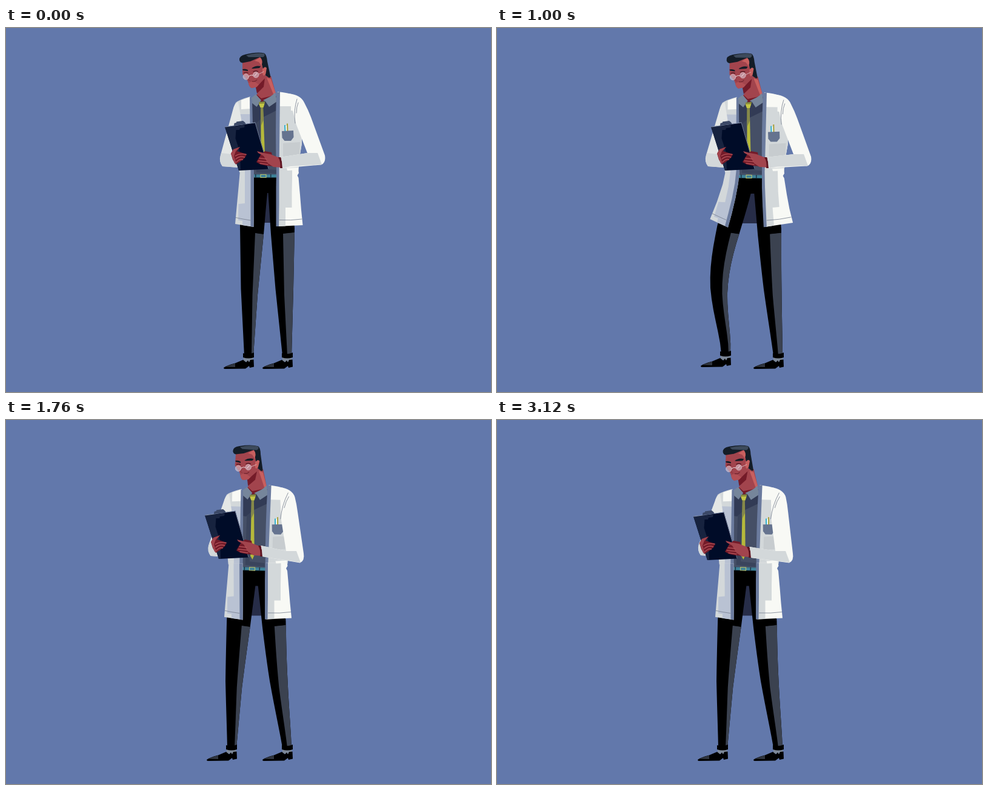
An HTML page that plays this animation: 800x600 px, repeating every 5.04 s.

```html
<!DOCTYPE html>
<html lang="en">
<head>
<meta charset="utf-8">
<title>Doctor with clipboard</title>
<style>
  html, body { margin: 0; width: 100%; height: 100%; overflow: hidden; background: #6278ab; }
  svg { display: block; width: 100%; height: 100%; }
</style>
</head>
<body>
<svg id="stage" viewBox="0 0 800 600"></svg>
<script>
const LOOP = 5040;
const stage = document.getElementById('stage');
const parts = [];

// Each track is a list of step, value pairs; steps run at twelve per second.
const tracks = {
  hipX: [7, 0, 8, -1, 12, -9, 15, -16.5, 21, -18.5],
  hipY: [7, 0, 12, 1, 15, 1.5],
  lean: [7, 0, 8, .2, 12, .8, 15, 1.7],
  nod: [15, 0, 21, 2.5, 25, 2.5, 37, .5],
  boardX: [7, 0, 8, -1, 12, -8, 15, -14, 21, -33, 25, -40, 28, -40.4, 37, -37],
  boardY: [12, 0, 15, .5, 21, -6, 25, -8, 28, -8, 37, -4],
  elbowX: [7, 0, 8, -1, 12, -8, 15, -14, 21, -35, 25, -42, 28, -42.3, 37, -38],
  elbowY: [7, 0, 12, 2, 15, 4, 21, 10, 25, 11, 37, 10],
  cuffX: [7, 0, 8, -1, 12, -9, 15, -16, 21, -19.5, 25, -21],
  cuffY: [12, 0, 15, 1, 21, -4, 25, -5],
  footX: [7, 0, 8, -1.5, 12, -23, 14, -28],
  footY: [7, 0, 8, -2, 10, -5, 12, -3, 14, 0],
  knee: [7, 0, 8, -13, 10, -20, 12, -18.5, 15, -3, 21, -1],
  flapL: [7, 0, 8, -3, 12, -18.5, 15, -11, 21, .5],
  flapR: [7, 0, 8, .5, 12, 7, 15, 4.5, 21, 0],
  blink: [0, 0, 1, .5, 2, 1, 3, .8, 4, .3, 5, 0]
};
const pose = {};

const clamp = v => Math.max(0, Math.min(1, v));
const mix = (a, b, k) => [a[0] + (b[0] - a[0]) * k, a[1] + (b[1] - a[1]) * k];

// Monotone cubic interpolation
function valueAt(track, step) {
  const last = track.length / 2 - 1;
  const at = i => track[2 * i], val = i => track[2 * i + 1];
  if (step <= at(0)) return val(0);
  if (step >= at(last)) return val(last);
  let i = 0;
  while (at(i + 1) <= step) i++;
  const slope = k => (val(k + 1) - val(k)) / (at(k + 1) - at(k));
  const tangent = k => {
    if (k === 0 || k === last) return 0;
    const a = slope(k - 1), b = slope(k);
    return a * b > 0 ? 2 * a * b / (a + b) : 0;
  };
  const span = at(i + 1) - at(i), u = (step - at(i)) / span, w = 1 - u;
  return val(i) * w * w * (1 + 2 * u) + val(i + 1) * u * u * (3 - 2 * u)
    + span * u * w * (tangent(i) * w - tangent(i + 1) * u);
}

function turn(x, y, cx, cy, degrees) {
  const a = degrees * Math.PI / 180, c = Math.cos(a), s = Math.sin(a);
  return [cx + (x - cx) * c - (y - cy) * s, cy + (x - cx) * s + (y - cy) * c];
}

// Maps from the resting position to the current pose
function body(x, y) {
  const [px, py] = turn(x, y, 428, 245, pose.lean);
  return [px + pose.hipX, py + pose.hipY];
}
const head = (x, y) => body(...turn(x, y, 425, 100, pose.nod));
const brow = (x, y) => head(x, y + 1.6 * pose.blink);
const board = (x, y) => [x + pose.boardX, y + pose.boardY];
const hips = (x, y) => [x + pose.hipX, y + pose.hipY];
const footL = (x, y) => [x + pose.footX, y + pose.footY];
const footR = (x, y) => [x + 64, y];

function leg(x, y, footX, footY, bend) {
  const s = clamp((y - 240) / 300);
  const bulge = clamp(Math.sin(Math.PI * s ** 1.2)) ** 1.5;
  return [x + pose.hipX * (1 - s) + footX * s + bend * bulge,
          y + pose.hipY * (1 - s) + footY * s];
}
const legL = (x, y) => leg(x, y, pose.footX, pose.footY, pose.knee);
const legR = (x, y) => leg(x, y, 0, 0, pose.hipX * .15);

function skirtL(x, y) {
  const t = clamp((y - 236) / 90);
  return hips(x + pose.flapL * t ** 1.4, y + pose.flapL * .5 * t * (409 - x) / 31);
}
function skirtR(x, y) {
  const t = clamp((y - 236) / 90), k = (x - 447) / 42;
  return hips(x + pose.flapR * t ** 1.6 * (.5 + .6 * k), y - pose.flapR * .7 * t * k);
}
function armL(x, y) {
  return mix(body(x, y), [x + pose.cuffX, y + pose.cuffY], clamp((y - 150) / 50));
}
function armR(x, y) {
  const p = mix(body(x, y), [x + pose.elbowX, y + pose.elbowY], clamp((y - 120) / 85));
  return y > 200 ? mix(p, board(x, y), clamp((490 - x) / 30)) : p;
}

function add(map, d, attrs) {
  const el = document.createElementNS('http://www.w3.org/2000/svg', 'path');
  for (const name in attrs) el.setAttribute(name, attrs[name]);
  stage.append(el);
  parts.push({ el, map, d });
}
const fill = (map, color, d) => add(map, d + 'Z', { fill: color });
const line = (map, color, width, d) =>
  add(map, d, { fill: 'none', stroke: color, 'stroke-width': width, 'stroke-linecap': 'round' });

// Straight outline cut into short pieces so that it can bend
function limb(map, color, outline) {
  const pts = outline.split(', ').map(p => p.split(' ').map(Number)), cuts = 6, out = [];
  pts.forEach((p, i) => {
    const next = pts[(i + 1) % pts.length];
    for (let k = 0; k < cuts; k++) out.push(mix(p, next, k / cuts).map(v => v.toFixed(2)).join(' '));
  });
  fill(map, color, 'M' + out.join(' L'));
}
function lens(x, y) {
  const pts = Array.from({ length: 20 }, (_, i) => {
    const a = i * Math.PI / 10;
    return (x + 4.7 * Math.cos(a)).toFixed(2) + ' ' + (y + 4.7 * Math.sin(a)).toFixed(2);
  });
  add(head, 'M' + pts.join(' L') + 'Z',
    { fill: '#e0d0dc', 'fill-opacity': .55, stroke: '#d9bcc6', 'stroke-width': .8 });
}

const WHITE = '#f8f9f5', GREY = '#d3d8da', LILAC = '#b9c2d3', LAPEL = '#6b7b9e';
const SKIN = '#a2444d', GLOW = '#c8605f', BLOOD = '#741b29', HAIR = '#141d27';
const SLATE = '#3b4250', SEAM = '#747d8d', FINGER = '#b04f56';

// Coat lining, legs and shoes
fill(hips, '#272d48', 'M412 262 L450 262 L448 321 L414 321');
fill(hips, '#000', 'M400 243 L452 243 L452 274 L433.5 272 L429.5 272 L400 274');
limb(legL, '#000', '390 250, 430 250, 431 272, 428 305, 425 340, 415 440, 408 540, 393 540, 387.5 430, 386 326');
limb(legL, SLATE, '411 338, 425 340, 415 440, 408 540, 405 540, 406.5 440');
limb(legR, '#000', '434 250, 470 250, 476 330, 474 430, 471 540, 456 540, 444.5 430, 437 340, 432.5 272');
limb(legR, SLATE, '457 339, 476 337, 474 430, 471 540, 464 540, 459 440');
for (const foot of [footL, footR]) {
  fill(foot, '#7d8898', 'M392 543 L407 543 L408 550 L392 550');
  fill(foot, '#000', 'M359 560 Q364 556 378 552.5 L391 547 L396 551 L399 548 L401 551 L403 547 L408.5 546.5 L409 558.5 L402 560 L401 557 L395 561.5 L361 562 Q359 562 359 560');
  fill(foot, '#2f343e', 'M362 558.5 Q367 555.5 378 553 L378 559');
  fill(foot, '#000', 'M391 536 Q400 539 409 535 L409 543 Q400 546 391 543');
}

// Shirt, tie and belt
fill(body, '#454f66', 'M404 118 L446 112 L448 245 L406 245');
fill(body, '#323b55', 'M406 122 L446 118 L446 136 L424 147 L412 158 L406 157');
fill(body, '#3a445c', 'M413 157 L420 150 L420 232 L446 234 L446 240 L413 238');
fill(body, '#b5b93b', 'M420 129 L424 129 L427.5 221 L424.5 228.5 L421 223');
fill(body, '#85884a', 'M420 129 L424 129 L424.6 152 L420.4 162');
fill(body, '#3d8299', 'M408 241.5 L447 241.5 L447 246.5 L408 246.5');
fill(body, '#1f3546', 'M411 241 L412.5 241 L412.5 247 L411 247');
fill(body, '#1f3546', 'M436 241 L437.5 241 L437.5 247 L436 247');
line(body, '#b3bd6b', 1.2, 'M420 241.5 L429 241.5 L429 246.5 L420 246.5 Z');

// Neck and collar
fill(head, SKIN, 'M411 96 L427 79 L437 79 L445 108 L424 119 L413 111 L417 104');
fill(head, BLOOD, 'M412 98 L427 83 L425 97 L414 108');
fill(head, GLOW, 'M430 82 L437 84 L445 108 L441 109');
fill(body, BLOOD, 'M413 109 L421 116 L438 112 L424 121 L420 121');
fill(body, '#76869b', 'M405 115 L412 109.5 L421 119 L413.5 130 L405 123');
fill(body, '#76869b', 'M424 119 L438 112 L444 106 L447 121 L434 130 L428 121');
fill(body, '#8b8d3c', 'M417 122 L427.5 121 L424.5 131 L419.5 131');
fill(body, '#c3c646', 'M417 125 L426.5 124.5 L424.5 131 L419.5 131');

// Face
fill(head, SKIN, 'M390 56 L422 47 L426 64 L431 67 L428 80 Q421 89 414 97 L405 99 Q401 97 400 91 L398 86 L390 76');
fill(head, GLOW, 'M410 54 L422 47 L425 60 L423 64 L417 56');
fill(head, GLOW, 'M423 67 Q428 62 431 66 L430 74 L425 79 L423 75');
fill(head, '#b34f55', 'M400 91 L407 87 L417 93 L413 97.5 L405 99 Q401 97 400 91');
fill(head, HAIR, 'M385 53 Q384 46 395 43.5 Q414 39 426 41.5 Q430 44 431 55 L436.5 81 L434 82 L428 78 L430 66 Q427 62 424 67 L422 60 Q424 53 419 48 L403 55 L390 57.5 Q386 57 385 53');
fill(head, '#3d4a5b', 'M396 45 Q412 40 426 42 Q428 46 424 48 L400 48');
fill(brow, HAIR, 'M390 68 Q395 66.5 399 69 L399 71 L391 70');
fill(brow, HAIR, 'M405 66.5 Q412 61 420 63 L418 66 L407 67');
line(brow, '#4d1520', 1.2, 'M392.5 74 Q396 72.5 399 74');
line(brow, '#4d1520', 1.2, 'M408 72 Q412 70 415.5 71.5');
line(head, '#5e1723', 1, 'M406 88 Q411 89 414 85.5');
line(head, '#8c333e', 1, 'M402 80 L400 86 L403 87');
lens(395.8, 80.4);
lens(412.2, 77.2);
line(head, '#eadade', 1, 'M400.5 79.5 Q404 76.5 407.5 78');
line(head, '#dfc3ca', .8, 'M417 76 L425 72');
line(head, '#f0e4e8', 1, 'M410 79 L414 74.5');

// Coat, left side
fill(body, GREY, 'M403 113 Q385 118 379 123 Q374 130 374 150 L385 238 L407 238');
fill(body, WHITE, 'M388 119 L403 113.5 L403 133 L388 134');
fill(body, LILAC, 'M386 142 L404 142 L404 238 L394 238 L394 160 L386 158');
fill(body, LAPEL, 'M402 113 L406 118 L409 238 L403.5 238');
fill(skirtL, GREY, 'M386 235 L409 235 L409 255 L409 280 L409 305 L408.5 328 L378 323 L381 290 L384 258');
fill(skirtL, LILAC, 'M394 235 L404 235 L404 262 L404 290 L404 327 L390 325 L390 318 L383 317 L383.5 290 L394 289 L394 262');
fill(skirtL, LAPEL, 'M403.5 235 L409 235 L409 255 L409 280 L409 305 L408.5 328 L403.5 327 L403.5 305 L403.5 280 L403.5 255');
line(skirtL, SEAM, .8, 'M379 312.5 L391 315 L403 317');

// Coat, right side
fill(body, WHITE, 'M448 105 Q482 108 490 121 L487 150 L488 190 L485 208 L482 238 L447 238');
fill(body, GREY, 'M450 129 L470 129 L470 136 L482 138 L486 152 L488 190 L485 208 L482 238 L450 238');
fill(body, '#c7cccf', 'M457 190 L485 188 L484 209 L457 212');
fill(body, LAPEL, 'M446 106 L452 105 L450.5 238 L446 238 Q444 170 446 106');
fill(skirtR, WHITE, 'M447 234 L482 234 L483 239 L480.5 243 L482.5 247 L485 275 L487 300 L489.5 325 L447 327 L446 290');
fill(skirtR, GREY, 'M450 234 L472 234 L472 247 L471.5 270 L471.5 296 L461 296 L461 326.5 L449 327');
fill(skirtR, WHITE, 'M463 231 L482 230 L482 234 L464 235');
fill(skirtR, LAPEL, 'M446 234 L450.5 234 L450.5 262 L450.5 290 L450 327 L445.5 327 L445.5 290 L445.5 262');
line(skirtR, SEAM, .8, 'M451 316.5 Q470 317.5 488 315');

// Pocket and pens
fill(body, WHITE, 'M461 161 L463.3 161 L463.5 171 L461 171');
fill(body, '#2fafcb', 'M459 160 L461 160 L461.5 171 L459.5 171');
fill(body, '#a9a03a', 'M463 157.5 L465 157.5 L465.5 171 L463.5 171');
fill(body, '#65738f', 'M455 170 L474 169 L474.5 180 L470 186 L459.5 186 L455.5 181');

// Left sleeve
fill(armL, '#e4e7e6', 'M383 122 Q377 124 374.5 134 L353.5 211 Q351 220 357 228 L383 230 L388 200 L388 150');
fill(armL, GREY, 'M355 206 L373 208 L383 230 L357 228 Q351 220 355 206');

// Clipboard
fill(board, '#000c28', 'M361 163 L411 156 L433.5 232.5 L384 235');
fill(board, '#17233f', 'M361 163 L380 160.5 L378.5 182 L386 205 L387 235 L384 235');
line(board, '#8895b0', 1.1, 'M361.5 163 L411 156');
line(board, '#6c7791', 1, 'M411 156 L433 232');
fill(board, '#3b4866', 'M376 161 L376.5 157 L380 156 L380 154.5 L391 153 L394 155.5 L396 158.5');
fill(board, '#18233f', 'M378 162 L394 159.5 L393 164 L386 165 L385 168 L379 168');

// Left hand
fill(board, BLOOD, 'M371 207 L375 200 L386 196 L381 203 L397 208 L394 214 L388 219 L379 225 L374 217');
fill(board, SKIN, 'M371 207 L375 200 L386 196 L379 203 L376 211 L380 224 L377 223');
line(board, FINGER, 1.4, 'M378 211 Q386 206 396 208.5');
line(board, FINGER, 1.4, 'M379 216 Q386 210 393.5 213');
line(board, FINGER, 1.4, 'M380 221 Q386 215 390.5 217');

// Right hand
fill(board, BLOOD, 'M413 221 L420 209 L427 203 L438 205 L442 228 L430 227 L420 225');
fill(board, SKIN, 'M414 203 L425 206 L436 208 L446 212 L455 215 L455 230 L441 229 L432 223 L425 211 L416 206');
line(board, FINGER, 1.3, 'M418 214.5 L430 216');
line(board, FINGER, 1.3, 'M416 219 L431 220.5');
line(board, FINGER, 1.3, 'M419 223 L432 225');
fill(board, '#5d1420', 'M449 213 L456 213 L457 231 L452 231 Q454 222 449 213');

// Right sleeve
fill(armR, WHITE, 'M466 108 Q486 110 492 123 Q498 134 503 147 L526 210 Q528 222 520 225.5 L456 231 Q456 222 453.5 213 L497 206 L478 157');
fill(armR, GREY, 'M453.5 213 L497 206 L514 206 L521 225 L470 228 L456 231 Q456 222 453.5 213');
line(armR, SEAM, .8, 'M480 117 Q474 136 477 157');
line(armR, SEAM, .8, 'M482 123 Q479 130 479 140');

function stepAt(time) {
  const within = Math.floor((time % 1000 - 40) / 80);
  return Math.floor(time / 1000) * 12 + Math.max(0, Math.min(11, within));
}

function render(step) {
  for (const name in tracks) pose[name] = valueAt(tracks[name], step);
  for (const { el, map, d } of parts) {
    el.setAttribute('d', d.replace(/(-?[\d.]+) (-?[\d.]+)/g,
      (_, x, y) => map(+x, +y).map(v => v.toFixed(2)).join(' ')));
  }
}

const start = performance.now();
let shown = -1;
function tick() {
  const step = stepAt((performance.now() - start) % LOOP);
  if (step !== shown) render(shown = step);
  requestAnimationFrame(tick);
}
tick();
</script>
</body>
</html>
```
